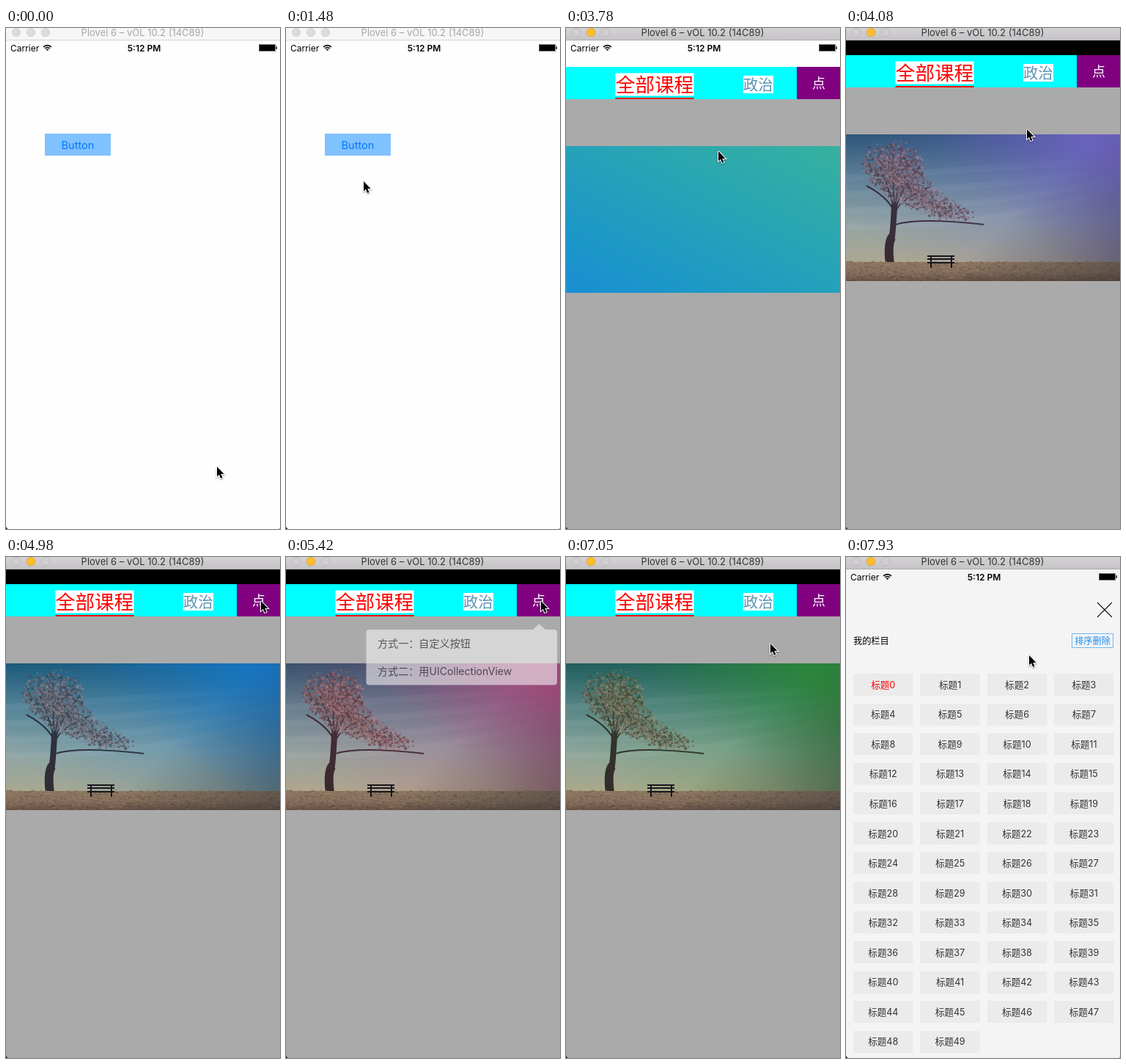
An HTML page with a canvas for the animation above (8 s loop, 374 px wide and 683 px high).

```html
<!DOCTYPE html>
<html lang="zh-CN">
<head>
<meta charset="utf-8">
<style>
html, body { margin: 0; width: 374px; height: 683px; overflow: hidden; background: #fff; }
canvas { display: block; }
</style>
</head>
<body>
<canvas id="stage" width="374" height="683"></canvas>
<script>
const ctx = document.getElementById('stage').getContext('2d');
const W = 374, H = 683, LOOP = 8000;
const FONT = 'Inter, "Noto Sans CJK SC", "Noto Sans CJK", sans-serif';
const ACTIVATE = 2290, COURSES = 3465, SETTLED = 4060, GRID = 7032;

// Screen refresh interval; the rhythm restarts when the window is activated
const REFRESH = 148.3;

// Pointer moves: start, end, x, y of the tip
const MOVES = [[0, 1180, 77, 342], [1180, 1480, 106, 209], [1480, 1930, 100, 160], [3330, 3768, 208, 168],
  [3768, 4830, 348, 60], [5720, 6165, 279, 118], [7480, 7920, 250, 134]];

// Tint hue at a few moments, unwrapped
const HUES = [[3768, 180], [4954, 610], [5399, 710], [7030, 1225]];

const ramp = (t, a, b) => Math.max(0, Math.min(1, (t - a) / (b - a)));

function refreshTime(t) {
  const origin = t < ACTIVATE ? 145 : ACTIVATE - 5;
  return Math.max(0, origin + Math.floor((t - origin) / REFRESH) * REFRESH);
}

function hueAt(t) {
  let hue = HUES[0][1];
  for (let i = 1; i < HUES.length; i++) {
    hue += (HUES[i][1] - HUES[i - 1][1]) * ramp(t, HUES[i - 1][0], HUES[i][0]);
  }
  return hue;
}

// Critically damped spring used when a page slides up
function slideOffset(t, start) {
  const x = Math.max(0, t - start) * 0.0185;
  return Math.floor((H - 16) * (1 + x) * Math.exp(-x));
}

function rect(x, y, w, h, fill) {
  ctx.fillStyle = fill;
  ctx.fillRect(x, y, w, h);
}

function frame(x, y, w, h, color) {
  ctx.strokeStyle = color;
  ctx.lineWidth = 1;
  ctx.strokeRect(x, y, w, h);
}

function text(str, x, y, size, fill, align = 'left', weight = 400) {
  ctx.font = `${weight} ${size}px ${FONT}`;
  ctx.textAlign = align;
  ctx.fillStyle = fill;
  ctx.fillText(str, x, y);
}

function trace(points) {
  ctx.beginPath();
  for (let i = 0; i < points.length; i += 2) ctx.lineTo(points[i], points[i + 1]);
}

function poly(points, fill) {
  trace(points);
  ctx.fillStyle = fill;
  ctx.fill();
}

function line(points, color, width) {
  trace(points);
  ctx.strokeStyle = color;
  ctx.lineWidth = width;
  ctx.stroke();
}

function curve(x0, y0, cx, cy, x1, y1, color, width) {
  ctx.beginPath();
  ctx.moveTo(x0, y0);
  ctx.quadraticCurveTo(cx, cy, x1, y1);
  ctx.strokeStyle = color;
  ctx.lineWidth = width;
  ctx.stroke();
}

function gradient(x0, y0, x1, y1, ...colors) {
  const g = ctx.createLinearGradient(x0, y0, x1, y1);
  colors.forEach((c, i) => g.addColorStop(i / (colors.length - 1), c));
  return g;
}

function randomizer(seed) {
  return () => (seed = seed * 16807 % 2147483647) / 2147483647;
}

function titleBar(active) {
  rect(0, 0, W, 16, active ? gradient(0, 0, 0, 16, '#d4d2d5', '#c5c3c6') : '#f6f6f6');
  rect(0, 16, W, 1, active ? '#aeacaf' : '#d2d2d2');
  for (let i = 0; i < 3; i++) {
    const lit = active && i === 1;
    ctx.beginPath();
    ctx.arc(14 + i * 20, 6, 5.7, 0, 7);
    ctx.fillStyle = lit ? '#fdbd2e' : active ? '#d1cfd2' : '#dcdcdc';
    ctx.fill();
    ctx.strokeStyle = lit ? '#dfa023' : active ? '#b5b3b6' : '#d0d0d0';
    ctx.lineWidth = 0.8;
    ctx.stroke();
  }
  text('Plovel 6 – vOL 10.2 (14C89)', 186.5, 11, 13, active ? '#333' : '#a6a6a6', 'center');
}

function statusBar() {
  text('Carrier', 6, 31.5, 12, '#000');
  text('5:12 PM', 188.5, 31.5, 12, '#000', 'center', 600);
  for (let r = 1.7; r < 8; r += 3) {
    ctx.beginPath();
    ctx.arc(56.5, 31.3, r, -Math.PI * 0.75, -Math.PI * 0.25);
    ctx.strokeStyle = '#000';
    ctx.lineWidth = 1.7;
    ctx.stroke();
  }
  frame(345.5, 22.5, 22, 9, '#777');
  rect(346, 23, 21, 8, '#000');
  rect(368.5, 25, 1.3, 4, '#000');
}

function buttonPage(t) {
  rect(0, 17, W, H - 17, '#fefefe');
  rect(53, 144, 90, 30, '#80c1ff');
  ctx.globalAlpha = t > 2870 && t < 3180 ? 0.3 : 1;
  text('Button', 98, 164.5, 14.6, '#007aff', 'center');
  ctx.globalAlpha = 1;
}

function tree() {
  const bark = '#33282a', random = randomizer(7);
  curve(60, 322, 56, 290, 64, 284, bark, 12);
  curve(62, 292, 65, 270, 66, 240, bark, 8);
  curve(68, 268, 100, 258, 188, 268, bark, 1.8);
  for (let i = 0; i < 6; i++) curve(67, 258, 65, 235, 28 + i * 18, 215 - 45 * Math.sin(i * 0.63), bark, 2);

  // Crown: lobes thin out as they swing from the top down to the right
  for (let i = 0; i < 2200; i++) {
    const u = random() ** 1.6, a = random() * 6.283, r = random() ** 0.7;
    const x = 62 + 88 * u * u + Math.cos(a) * r * (42 - 12 * u);
    const y = 180 + 76 * u + Math.sin(a) * r * (30 - 21 * u);
    const size = 1 + random() * 2.4;
    rect(x, y, size, size, `hsla(12, 14%, ${20 + random() * 40}%, .75)`);
  }
}

function bench() {
  const wood = '#17171c';
  for (const y of [310, 314, 319]) rect(111, y, 37, 2, wood);
  for (const x of [115, 143]) rect(x, 311, 2, 16, wood);
}

function field() {
  const random = randomizer(3);
  rect(0, 319, W, 26, gradient(0, 319, 0, 345, '#8c7660', '#866f5d', '#665145'));
  for (let i = 0; i < 700; i++) {
    rect(random() * W, 317 + random() * 27, 3, 1, i % 2 ? 'rgba(185,155,120,.3)' : 'rgba(55,40,35,.3)');
  }
}

function photo(hue) {
  const tint = a => `oklch(0.56 0.15 ${hue} / ${a})`;
  rect(0, 145, W, 200, gradient(0, 145, 0, 325, '#1f5468', '#5d8591', '#93a7a2', '#b3ab8c'));
  for (let i = 0; i < 4; i++) {
    curve(0, 205 + i * 22, 200, 190 + i * 28, W, 180 + i * 12, 'rgba(230,230,225,.06)', 9);
  }
  tree();
  rect(0, 145, W, 200, gradient(100, 350, 290, 120, tint(0.05), tint(0.26), tint(0.9)));
  field();
  rect(0, 145, W, 200, gradient(260, 225, 374, 345, 'rgba(50,50,50,0)', 'rgba(50,50,50,.5)'));
  bench();
}

function coursePage(t) {
  const hue = hueAt(t), settled = t >= SETTLED;
  if (settled) rect(0, 17, W, 20, '#000');
  ctx.save();
  ctx.translate(0, slideOffset(t, COURSES));
  rect(0, 37, W, 44, '#0ff');
  rect(67.5, 45.5, 107, 31, '#fff');
  text('全部课程', 121, 71, 26.6, '#f00', 'center');
  rect(67.5, 79, 107, 2, '#f00');
  rect(242, 49, 41, 24, '#fff');
  text('政治', 262.3, 69, 20.3, '#5b93b5', 'center');
  rect(315, 37, 59, 44, '#800080');
  text('点', 345, 66, 18, '#fff', 'center');
  rect(0, 81, W, H, '#aaa');
  if (settled) photo(hue);
  else rect(0, 145, W, 200, gradient(106, 401, 268, 89, `oklch(.62 .14 ${hue + 62})`, `oklch(.69 .11 ${hue})`));
  ctx.restore();
}

function popover(alpha) {
  if (!alpha) return;
  ctx.save();
  ctx.globalAlpha = alpha;
  ctx.beginPath();
  ctx.roundRect(109.5, 99, 260.5, 75.5, 4);
  ctx.moveTo(337, 99);
  ctx.lineTo(345.5, 91);
  ctx.lineTo(354, 99);
  ctx.fillStyle = '#f4f4f4';
  ctx.fill();
  text('方式一：自定义按钮', 125, 123, 14.1, '#000');
  text('方式二：用UICollectionView', 125, 161, 14.1, '#000');
  ctx.restore();
}

function gridPage(t) {
  ctx.save();
  ctx.translate(0, slideOffset(t, GRID));
  rect(0, 17, W, H, '#f4f4f4');
  line([343, 62, 363, 82], '#111', 1.1);
  line([363, 62, 343, 82], '#111', 1.1);
  text('我的栏目', 10, 118.7, 12.2, '#000', 'left', 500);
  frame(308.5, 104.5, 56, 19, '#6fb9f5');
  text('排序删除', 336.5, 118.7, 12.2, '#1a8cf0', 'center');
  for (let i = 0; i < 50; i++) {
    const x = 10 + i % 4 * 91.4, y = 159 + Math.floor(i / 4) * 40.55;
    rect(Math.round(x), Math.round(y), 81.5, 30, '#ebebeb');
    text('标题' + i, x + 40.7, y + 19.8, 12.6, i ? '#333' : '#f00', 'center');
  }
  ctx.restore();
}

function pointer(t) {
  let x = 288, y = 598;
  for (const [from, to, toX, toY] of MOVES) {
    const k = ramp(t, from, to);
    x += (toX - x) * k;
    y += (toY - y) * k;
  }
  ctx.save();
  ctx.translate(Math.round(x), Math.round(y));
  ctx.shadowColor = 'rgba(0,0,0,.4)';
  ctx.shadowBlur = 2;
  ctx.shadowOffsetY = 1;
  const shape = [0, 0, 0, 13.5, 3, 10.8, 5.2, 16, 7.5, 15, 5.3, 9.9, 9.6, 9.9, 0, 0];
  line(shape, '#fff', 2);
  ctx.shadowColor = 'transparent';
  poly(shape, '#000');
  ctx.restore();
}

function draw(t) {
  buttonPage(t);
  if (t >= COURSES) coursePage(t);
  popover(ramp(t, 5280, 5480) - ramp(t, 6240, 6430));
  if (t >= GRID) gridPage(t);
  if (t < SETTLED || t > GRID + 300) statusBar();
  titleBar(t >= ACTIVATE - 5);
  poly([0, 680, 0, H, 2.5, H], '#2b2350');
  poly([W, 681, W, H, W - 2, H], '#aaa');
  pointer(t);
}

const start = performance.now();
function tick() {
  draw(refreshTime((performance.now() - start) % LOOP));
  requestAnimationFrame(tick);
}
tick();
</script>
</body>
</html>
```
